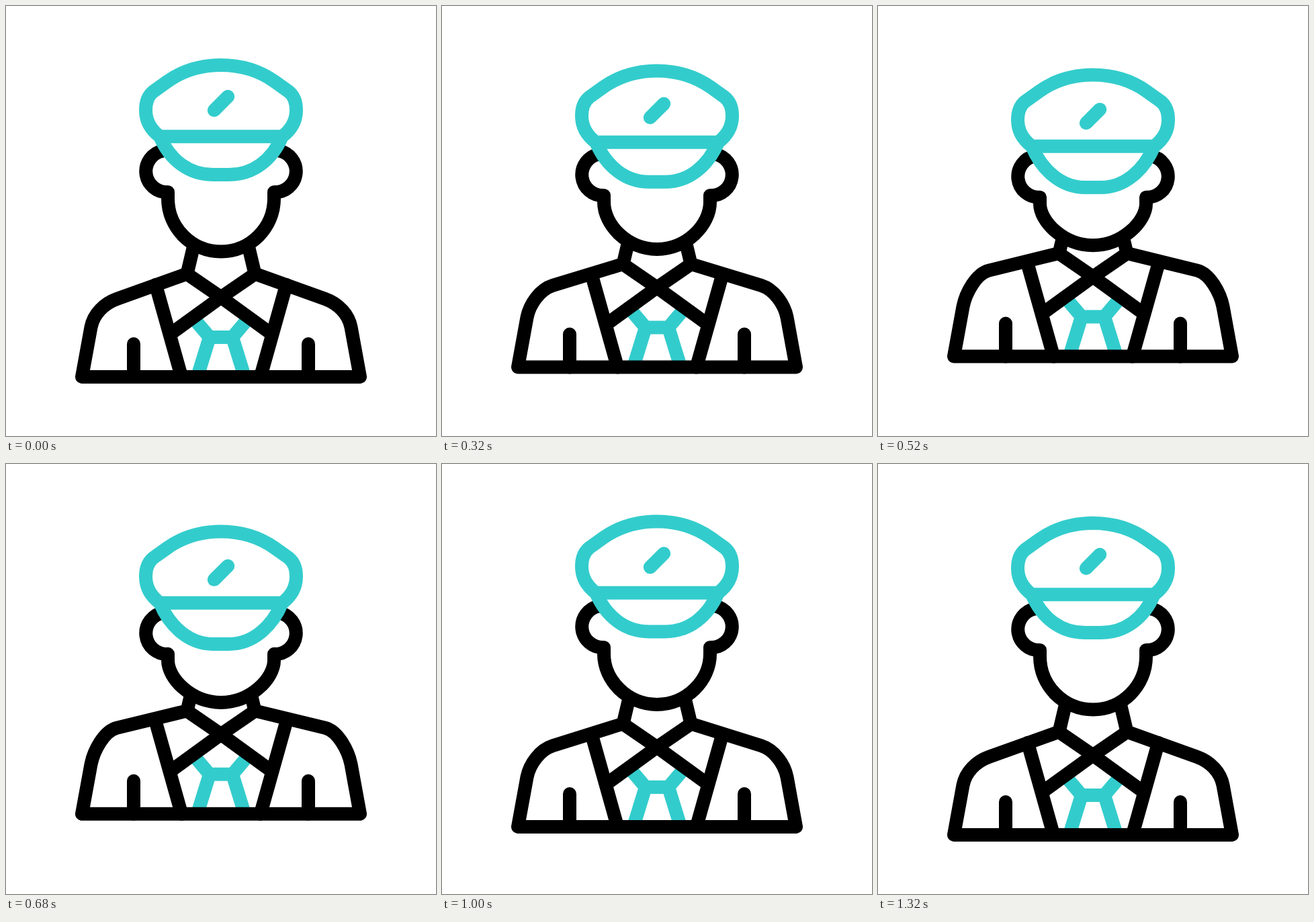
Animation, 640 px wide and 640 px high, one loop 1.36 s. Source, as an HTML page:

```html
<!DOCTYPE html>
<html lang="en">
<head>
<meta charset="utf-8">
<title>Officer</title>
<style>
  html, body { margin: 0; width: 100%; height: 100%; overflow: hidden; background: #fff; }
  svg { display: block; width: 100%; height: 100%; }
  path { fill: none; stroke: #000; stroke-width: 20; stroke-linejoin: round; }
  .teal { stroke: #33cccc; }
  .filled { fill: #fff; }
  .round { stroke-linecap: round; }
  .sharp { stroke-linejoin: miter; }
</style>
</head>
<body>
<svg viewBox="0 0 640 640">
  <g id="torso">
    <g id="torsoHalf">
      <path class="teal sharp" d="M281 467L303 493H320M303 493L286 548"/>
      <path id="jacket"/>
      <path d="M269 398.5L320 433.5L247 486.5"/>
      <path class="round" d="M222.8 415L261.3 552M190 503V552"/>
    </g>
    <use href="#torsoHalf" transform="matrix(-1 0 0 1 640 0)"/>
  </g>
  <g id="faceHalf"><path id="face" class="filled"/></g>
  <use href="#faceHalf" transform="matrix(-1 0 0 1 640 0)"/>
  <g id="hat">
    <g id="hatHalf">
      <path id="visor" class="teal filled"/>
      <path class="teal filled" d="M320 88C286 88 259 99 240 112.5L219 127.5C211 134 208 144 208 155C208 171 216 184.5 229 194.3H320"/>
    </g>
    <use href="#hatHalf" transform="matrix(-1 0 0 1 640 0)"/>
    <path id="badge" class="teal round" d="M309.8 155.2L330.2 134.8"/>
  </g>
</svg>
<script>
  const LOOP = 1360, STEP = 40;
  const times = [0, 160, 320, 520, 620, 840, 1000, 1120, 1220, 1320];
  const lift = [0, 2, 14.5, 30.5, 32, 26.2, 12, 3.2, 0.7, 0];
  const nod = [0, 0.8, 5, 7.7, 7.2, 1.3, -4, -4.2, -1.8, 0];
  const tilt = [0, 0.08, 0.48, 0.95, 0.98, 0.68, 0.2, 0.04, 0, 0];

  const $ = id => document.getElementById(id);
  const shape = (id, d) => $(id).setAttribute("d", d);
  const shift = (id, y) => $(id).setAttribute("transform", `translate(0 ${y})`);

  // Smooth curve through the key values, at rest at both ends
  function sample(values, t) {
    const last = times.length - 1;
    if (t >= times[last]) return values[last];
    const i = times.findIndex(k => k > t) - 1;
    const slope = n => n === 0 || n === last ? 0
      : (values[n + 1] - values[n - 1]) / (times[n + 1] - times[n - 1]);
    const span = times[i + 1] - times[i], s = (t - times[i]) / span;
    const ease = s * s * (3 - 2 * s);
    return values[i] + (values[i + 1] - values[i]) * ease
      + span * s * (1 - s) * (slope(i) * (1 - s) - slope(i + 1) * s);
  }

  function draw(t) {
    const up = sample(lift, t), head = sample(nod, t), lean = sample(tilt, t);

    const shoulder = 436 - 0.39 * up;
    const bend = shoulder + 19 * (shoulder - 398.5) / 104;
    shift("torso", -up);
    shape("jacket", `M281 350L269.5 398.5L165 ${shoulder}C146 ${bend} 130.5 458 126.5 478L113 552H320`);

    const ear = 277 + head;
    const squash = 17.8 * lean;
    const chin = 365.5 + head - squash;
    shape("face", `M234 ${ear - 61.5}A31 31 0 0 0 241 ${ear}V${ear + 9.5}`
      + `C241 ${ear + 53 - squash} 276.4 ${chin} 320 ${chin}`);

    const drop = 4.8 * lean;
    shift("hat", head + 7.2 * lean);
    shape("visor", `M229 194C244 230 273 ${251 + drop} 308 ${251 + drop}H320`);
    shift("badge", drop);
  }

  const start = performance.now();
  function tick() {
    const t = (performance.now() - start) % LOOP;
    draw(Math.floor(t / STEP) * STEP);
    requestAnimationFrame(tick);
  }
  tick();
</script>
</body>
</html>
```
